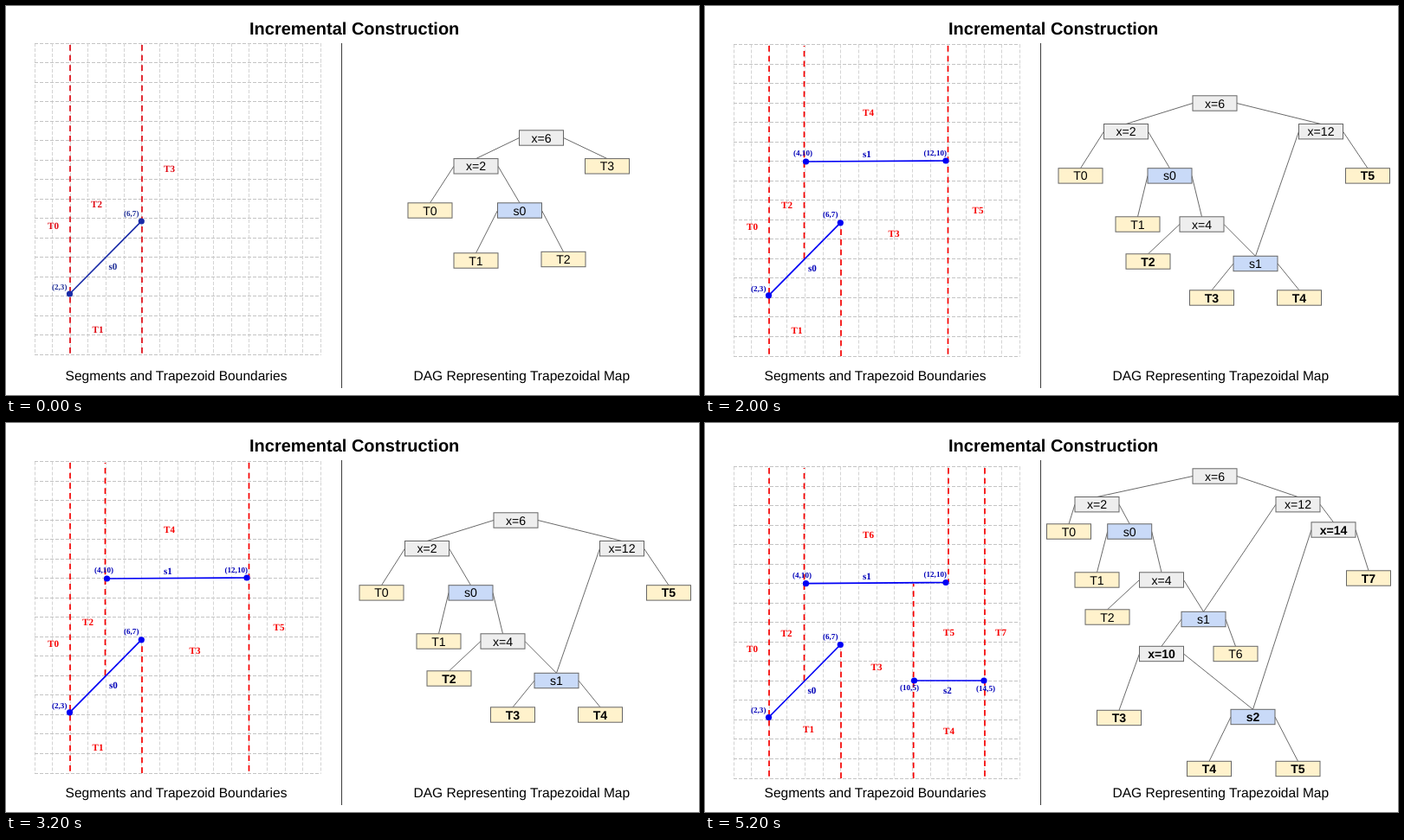
An HTML page that plays this animation: 800 px wide and 450 px high, repeating every 6000 ms.

```html
<!DOCTYPE html>
<html lang="en">
<head>
<meta charset="utf-8">
<title>Incremental Construction</title>
<style>
html, body { margin: 0; width: 100%; height: 100%; overflow: hidden; background: #fff; }
svg { display: block; width: 800px; height: 450px; }
text { font-family: "Liberation Sans", Arial, sans-serif; text-rendering: geometricPrecision; }
.title { font-size: 20px; font-weight: bold; }
.caption { font-size: 15.56px; }
.node { font-size: 14.1px; }
.bold { font-weight: bold; }
.label { font: bold 11.1px "Liberation Serif", "Times New Roman", serif; }
.coord { font-size: 9.1px; }
.middle { text-anchor: middle; }
.row, .column { stroke: #c4c4c4; stroke-width: 1; stroke-dasharray: 4 2; }
.column { stroke: #d4d4d4; }
.wall { stroke-width: 1.7; stroke-dasharray: 6.67 5; }
.segment { stroke-width: 1.7; }
.edge { stroke: #595959; stroke-width: .9; }
.box { stroke: #666; stroke-width: 1; }
</style>
</head>
<body>
<svg id="stage" viewBox="0 0 800 450">
  <text class="title middle" x="402.2" y="33">Incremental Construction</text>
  <text class="caption middle" x="196.5" y="432.5">Segments and Trapezoid Boundaries</text>
  <text class="caption middle" x="595.3" y="432.5">DAG Representing Trapezoidal Map</text>
  <path d="M387.5 43V442" stroke="#444" stroke-width="1.1"/>
</svg>
<script>
const STEP = 2000;
const stage = document.getElementById('stage');

// walls: x, y1, y2; segments: x1, y1, x2, y2; labels: text, x, baseline
// nodes: name -> x, y, left child, right child
const scenes = [
  {
    top: 43, red: '#e00a14', blue: '#1a2ca8', ink: '#1c2c96',
    walls: [[74, 45, 403], [157, 45, 403]],
    segments: [[73.5, 333, 156.3, 249]],
    labels: [['T0', 48, 258], ['T1', 99.5, 378], ['T2', 98, 233], ['T3', 182, 192],
      ['s0', 118.5, 305], ['(2,3)', 53, 328], ['(6,7)', 136, 243]],
    bold: [],
    nodes: {
      'x=6': [618, 152.5, 'x=2', 'T3'],
      'x=2': [542.5, 185.3, 'T0', 's0'],
      s0: [593, 236.5, 'T1', 'T2'],
      T0: [489.5, 236.5], T1: [542.5, 294.5], T2: [643.5, 293], T3: [694, 185.3]
    }
  },
  {
    top: 44.5, red: '#f70000', blue: '#0000f5', ink: '#0000b8',
    walls: [[74, 46, 405], [114.5, 292, 46], [157, 405, 251], [280.5, 46, 405]],
    segments: [[73.5, 334.8, 156.3, 250.8], [116.5, 180, 278, 179]],
    labels: [['T0', 48, 259], ['T1', 99.5, 379], ['T2', 88, 234], ['T3', 211.5, 267],
      ['T4', 182, 127], ['T5', 308.5, 240], ['s0', 119, 307], ['s1', 182, 175],
      ['(2,3)', 53, 330], ['(6,7)', 136, 244], ['(4,10)', 102, 173], ['(12,10)', 252.5, 172.5]],
    bold: ['T2', 'T3', 'T4', 'T5'],
    nodes: {
      'x=6': [588.5, 112.5, 'x=2', 'x=12'],
      'x=2': [486, 145.2, 'T0', 's0'],
      'x=12': [711, 145.2, 's1', 'T5'],
      s0: [536.5, 196.4, 'T1', 'x=4'],
      'x=4': [573.5, 252.5, 'T2', 's1'],
      s1: [635.5, 298, 'T3', 'T4'],
      T0: [433.5, 196.4], T1: [499.5, 252.5], T2: [511.5, 295.5],
      T3: [585, 337.5], T4: [686, 337.5], T5: [765, 196.4]
    }
  },
  {
    top: 50.5, red: '#f70000', blue: '#0000f5', ink: '#0000b8',
    walls: [[74, 52, 411], [114.5, 298, 52], [157, 411, 258], [281, 52, 184],
      [240.7, 411, 186], [323, 52, 411]],
    segments: [[73.5, 340.5, 156.3, 256.5], [116.5, 185.7, 278, 184.5], [241.5, 298, 322, 298]],
    labels: [['T0', 48, 265], ['T1', 113, 358], ['T2', 87.5, 247], ['T3', 191.5, 286],
      ['T4', 275, 360], ['T5', 275, 246], ['T6', 182, 132.5], ['T7', 335, 246],
      ['s0', 118.5, 312.5], ['s1', 182, 181], ['s2', 275, 313],
      ['(2,3)', 53, 335], ['(6,7)', 136, 250], ['(4,10)', 101, 179],
      ['(12,10)', 252.5, 178], ['(10,5)', 225, 309], ['(14,5)', 313, 310]],
    bold: ['x=10', 'x=14', 's2', 'T3', 'T4', 'T5', 'T7'],
    nodes: {
      'x=6': [588.5, 61.5, 'x=2', 'x=12'],
      'x=2': [452.5, 94.2, 'T0', 's0'],
      'x=12': [684.5, 94.2, 's1', 'x=14'],
      s0: [490.2, 125.5, 'T1', 'x=4'],
      'x=14': [725.5, 123.5, 's2', 'T7'],
      'x=4': [527, 181.5, 'T2', 's1'],
      s1: [575.5, 227, 'x=10', 'T6'],
      'x=10': [527, 267, 'T3', 's2'],
      s2: [632.5, 340, 'T4', 'T5'],
      T0: [420, 125.5], T1: [452.5, 181.5], T2: [464.5, 224.5], T3: [478, 341],
      T4: [582, 400], T5: [684.5, 400], T6: [612.5, 267], T7: [766, 179.5]
    }
  }
];

function add(parent, tag, attrs, text) {
  const el = document.createElementNS('http://www.w3.org/2000/svg', tag);
  for (const key in attrs) el.setAttribute(key, attrs[key]);
  if (text) el.textContent = text;
  parent.append(el);
  return el;
}

function line(g, cls, x1, y1, x2, y2, stroke) {
  add(g, 'line', stroke ? { class: cls, x1, y1, x2, y2, stroke } : { class: cls, x1, y1, x2, y2 });
}

function drawMap(g, s) {
  const left = 33, width = 330.6, height = 360.5, cells = 16;
  for (let i = 0; i <= cells; i++) {
    const x = Math.round(left + i * width / cells - .5) + .5;
    const y = Math.round(s.top + i * height / cells - .5) + .5;
    line(g, 'column', x, s.top, x, s.top + height);
    line(g, 'row', left, y, left + width, y);
  }
  for (const [x, y1, y2] of s.walls) line(g, 'wall', x, y1, x, y2, s.red);
  for (const [x1, y1, x2, y2] of s.segments) {
    line(g, 'segment', x1, y1, x2, y2, s.blue);
    add(g, 'circle', { cx: x1, cy: y1, r: 3.6, fill: s.blue });
    add(g, 'circle', { cx: x2, cy: y2, r: 3.6, fill: s.blue });
  }
  for (const [text, x, y] of s.labels) {
    const cls = text[0] === '(' ? 'label coord' : 'label';
    add(g, 'text', { class: cls, x, y, fill: text[0] === 'T' ? s.red : s.ink }, text);
  }
}

function drawGraph(g, s) {
  const w = 51, h = 17.4;
  const fills = { x: '#eee', s: '#c9daf8', T: '#fff2cc' };
  for (const [x, y, ...kids] of Object.values(s.nodes)) {
    kids.forEach((kid, i) => {
      const [kx, ky] = s.nodes[kid];
      line(g, 'edge', x + (i ? w : -w) / 2, y, kx, ky - h / 2);
    });
  }
  for (const [name, [x, y]] of Object.entries(s.nodes)) {
    add(g, 'rect', { class: 'box', x: x - w / 2, y: y - h / 2, width: w, height: h, fill: fills[name[0]] });
    const cls = 'node middle' + (s.bold.includes(name) ? ' bold' : '');
    add(g, 'text', { class: cls, x, y: y + 5 }, name);
  }
}

const groups = scenes.map(s => {
  const g = add(stage, 'g', { visibility: 'hidden' });
  drawMap(g, s);
  drawGraph(g, s);
  return g;
});

const start = performance.now();
function render(now) {
  const current = Math.floor(Math.max(0, now - start) / STEP) % groups.length;
  groups.forEach((g, i) => g.setAttribute('visibility', i === current ? 'visible' : 'hidden'));
  requestAnimationFrame(render);
}
render(start);
</script>
</body>
</html>
```
